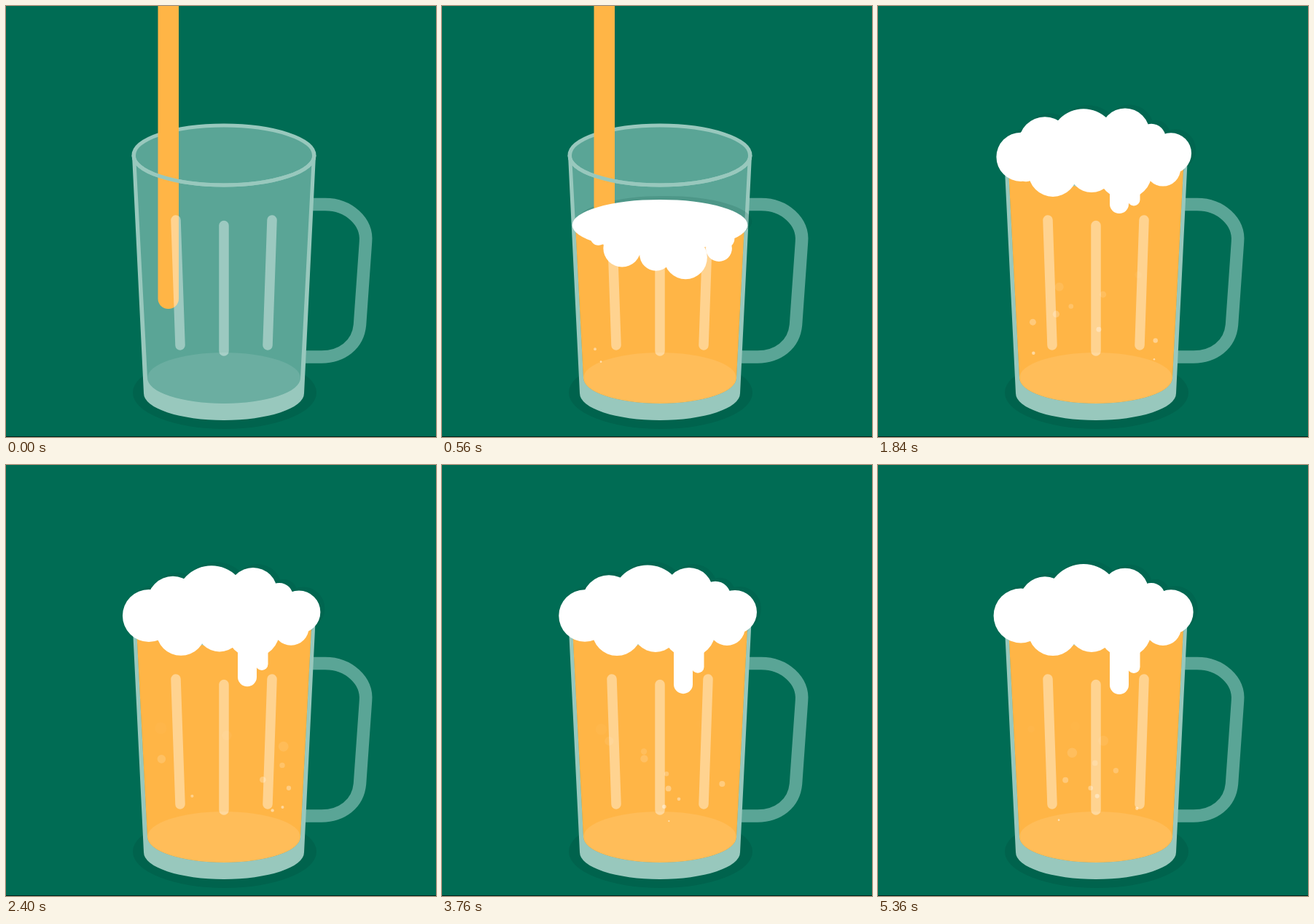
Animation, 590 px wide and 592 px high, one loop 5440 ms. Source, as an HTML page with a canvas:

```html
<!DOCTYPE html>
<html lang="en">
<head>
<meta charset="utf-8">
<title>Beer mug</title>
<style>
  html, body { margin: 0; width: 100%; height: 100%; overflow: hidden; background: #006c54; }
  canvas { display: block; }
</style>
</head>
<body>
<canvas id="stage" width="590" height="592"></canvas>
<script>
const ctx = document.getElementById('stage').getContext('2d');
const LOOP = 5440, STEP = 80, TAU = Math.PI * 2;
const CX = 299, RIM = 205, FLOOR = 511;
const GLASS = '#5aa596', EDGE = '#98c8bd', BEER = '#ffb546';

const clamp = v => Math.max(0, Math.min(1, v));
const mix = (a, b, p) => a + (b - a) * p;

// Foam lobes: x, height relative to the surface, radius when full, later swelling
const crown = [
  [196, 2, 27, 10], [229, -17, 35, 1], [282, -18, 42, 8],
  [339, -31, 33, 0], [375, -24, 20, 0], [402, -3, 27, 3]
];
const skirt = [
  [203, 22, 14, 0], [240, 23, 33, 1], [293, 20, 29, 3],
  [339, 23, 38, -2], [391, 18, 23, 2], [402, 8, 15, 0]
];

let seed = 11;
const rand = () => (seed = seed * 16807 % 2147483647) / 2147483647;

const RISE = .13, SOURCE = 490, LIFE = 1080;
const bubbles = Array.from({ length: 50 }, (_, i) => ({
  x: 210 + 178 * rand(),
  born: 380 + 100 * i + 80 * rand(),
  size: .65 + .5 * rand()
}));

function oval(x, y, rx, ry, color) {
  ctx.beginPath();
  ctx.ellipse(x, y, rx, ry, 0, 0, TAU);
  ctx.fillStyle = color;
  ctx.fill();
}

function line(path, width, color, cap = 'butt') {
  ctx.lineWidth = width;
  ctx.strokeStyle = color;
  ctx.lineCap = cap;
  ctx.stroke(new Path2D(path));
}

// Tapered wall with a rounded bottom
function cup(top, bottom, y, ry) {
  const p = new Path2D();
  p.moveTo(CX - top, RIM);
  p.lineTo(CX - bottom, y);
  p.ellipse(CX, y, bottom, ry, 0, Math.PI, 0, true);
  p.lineTo(CX + top, RIM);
  p.ellipse(CX, RIM, top, 41, 0, 0, Math.PI, true);
  p.closePath();
  return p;
}
const outer = cup(126, 110, 532, 37);
const inner = cup(121, 105, FLOOR, 35);

function rim(end) {
  ctx.beginPath();
  ctx.ellipse(CX, RIM, 124, 41, 0, 0, end);
  ctx.lineWidth = 5;
  ctx.strokeStyle = EDGE;
  ctx.stroke();
}

const surface = t => RIM + (FLOOR - RIM) * (1 - clamp((t - 80) / 2400)) ** 5.2;

function foamShape(t, level) {
  const p = new Path2D();
  const add = (x, y, rx, ry = rx) => {
    p.moveTo(x + rx, y);
    p.ellipse(x, y, rx, ry, 0, 0, TAU);
  };
  const start = clamp((t - 80) / 200);
  const grow = Math.sin(clamp((t - 560) / 640) * Math.PI / 2);
  const settle = t > 1200 ? 1 - Math.exp((1200 - t) / 700) : 0;

  add(CX, level, mix(110, 125, (FLOOR - level) / (FLOOR - RIM)) * start, 35 * start);
  for (const [x, dy, r, swell] of crown) {
    const wave = 1.3 * Math.cos(TAU * (t - 1760) / 2700 + (x - 339) / 20);
    add(x, level + dy * grow, r * grow + (swell + wave) * settle);
  }
  // The skirt hangs lowest near the middle while the mug fills
  for (const [x, dy, r, swell] of skirt) {
    const sag = 22 * (1 - ((x - 325) / 110) ** 2) * (1 - grow);
    const spread = start * mix(.88, 1, grow);
    add(mix(CX, x, spread), level + (dy + sag) * start, r * start * mix(.78, 1, grow) + swell * settle);
  }
  return p;
}

function drip(t, x, r, end, left) {
  if (t < 1300) return;
  const y = Math.max(226, end - left * Math.exp((1840 - t) / 540));
  line(`M${x} 225V${y}`, r * 2, '#fff', 'round');
}

function drawStream(t, level) {
  const tail = Math.max(-30, (t - 760) * 1.2);
  const head = t < 80 ? 402 + 1.2 * t : level;
  if (tail >= head) return;
  ctx.fillStyle = BEER;
  ctx.beginPath();
  ctx.roundRect(208.5, tail, 28.5, head + 14 - tail, 14);
  ctx.fill();
}

function drawBeer(t, level) {
  if (t < 80) return;
  const spread = clamp((t - 20) / 140);
  ctx.save();
  ctx.clip(inner);
  oval(CX, level, 112 * spread, 30 * spread, BEER);
  if (spread === 1) ctx.fillRect(150, level, 300, 400);
  ctx.restore();
}

function drawBubbles(t) {
  for (const b of bubbles) {
    const age = t - b.born, p = age / LIFE;
    if (p < 0 || p > 1) continue;
    const r = (1.5 + 6.5 * p) * b.size;
    oval(b.x, SOURCE - age * RISE, r, r, `rgba(255,255,255,${.55 * (1 - p) ** 1.3})`);
  }
}

function draw(t) {
  const level = surface(t);
  const foam = foamShape(t, level);
  ctx.fillStyle = '#006c54';
  ctx.fillRect(0, 0, 590, 592);
  oval(300, 531, 126, 50, '#00634d');
  line('M418 272.5H438C470 272.5 496 296 493.5 324L485.5 438C483 466 460 482 433 482H408', 17.5, GLASS);

  ctx.fillStyle = EDGE;
  ctx.fill(outer);
  ctx.fillStyle = GLASS;
  ctx.fill(inner);
  rim(TAU);

  ctx.save();
  ctx.translate(6, -5);
  ctx.fillStyle = 'rgba(0,70,54,.15)';
  ctx.fill(foam);
  ctx.restore();

  drawStream(t, level);
  drawBeer(t, level);
  oval(CX, FLOOR, 105, 35, 'rgba(255,255,255,.1)');
  drawBubbles(t);
  rim(Math.PI);

  const shine = 'rgba(255,255,255,.4)';
  line('M233 294L239 466', 13.5, shine, 'round');
  line('M299 301.5V474', 13.5, shine, 'round');
  line('M365 294L359 466', 13.5, shine, 'round');

  ctx.fillStyle = '#fff';
  ctx.fill(foam);
  drip(t, 331, 13, 302, 30);
  drip(t, 351, 8.5, 277.5, 11.5);

  ctx.fillStyle = '#00251d';
  ctx.fillRect(0, 591, 590, 1);
}

const begin = performance.now();
function tick() {
  const t = (performance.now() - begin) % LOOP;
  draw(Math.floor(t / STEP) * STEP);
  requestAnimationFrame(tick);
}
tick();
</script>
</body>
</html>
```
